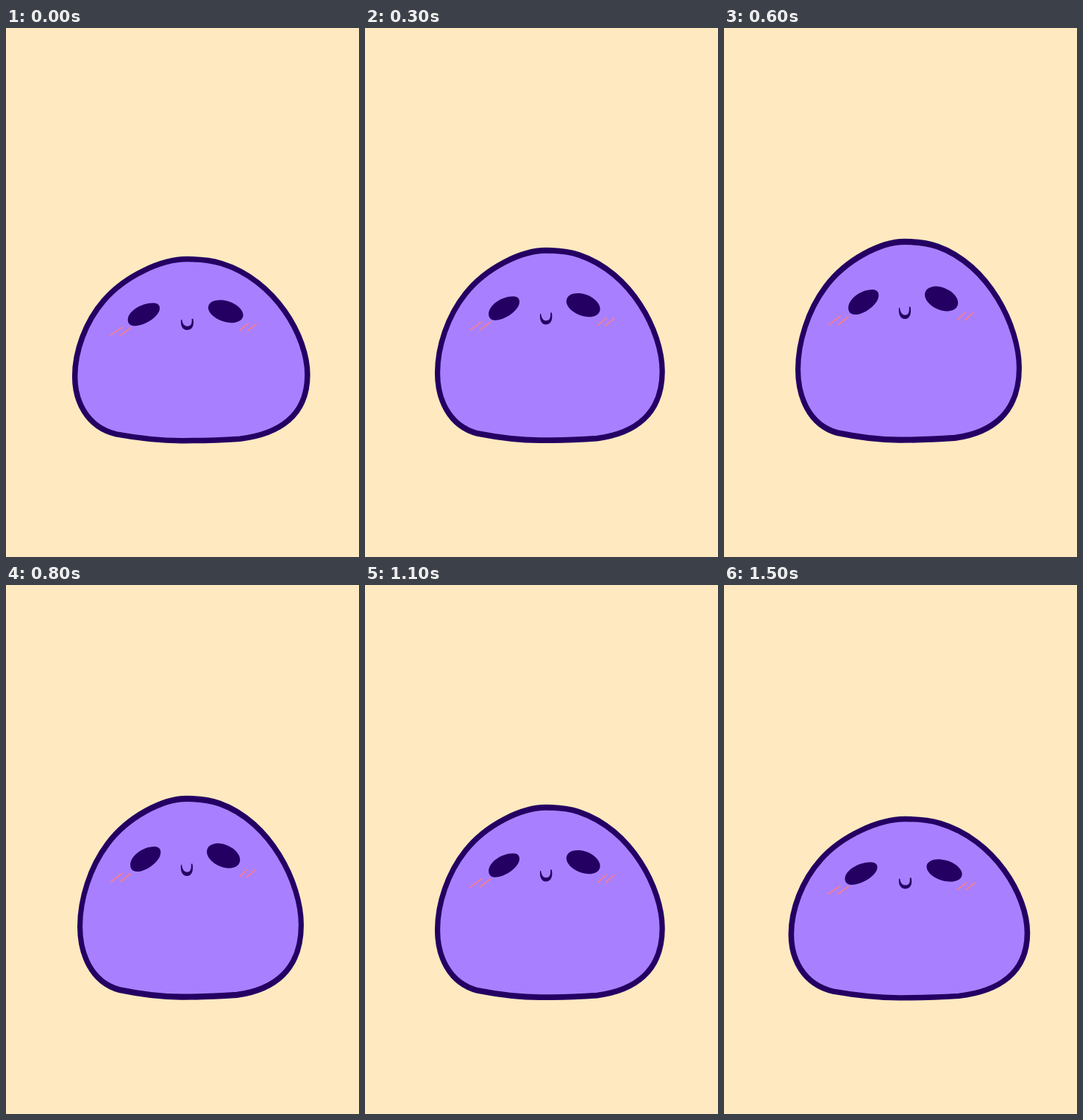
Write an HTML page that moves like this. It is 480 px wide and 720 px high and loops after 1600 ms.

```html
<!DOCTYPE html>
<html lang="en">
<head>
<meta charset="utf-8">
<title>Slime</title>
<style>
  html, body { margin: 0; width: 100%; height: 100%; overflow: hidden; background: #ffe9c0; }
  svg { display: block; width: 100%; height: 100%; }
</style>
</head>
<body>
<svg viewBox="0 0 480 720">
  <g id="slime" fill="#240063">
    <path fill="#a880ff" stroke="#240063" stroke-width="7.5" stroke-linejoin="round"
      d="M246 314.6C262 314.6 280 316.5 293 320.5C366 343 409.8 420 409.8 472C409.8 528 371 553 318 559.3C290 561 262 561.9 238 561.8C205 561.8 172 557 150 553C109 543 93.7 507 93.7 474C93.7 440 108 400 133 371C162 337 212 314.6 246 314.6Z"/>
    <path d="M165.7 397C166 386 183 374.5 200 374.3C208 374.3 210 379 208.7 384C206 394 188 405.5 175 405.5C169 405.5 165.5 402 165.7 397Z"/>
    <ellipse rx="24.6" ry="14.1" transform="translate(298.7 385.7) rotate(18.5)"/>
    <path d="M238 397C237 406 240.5 411 246.5 411C253 411 256.5 405 254.3 395.5L252.5 396C253.3 402 251.5 406 247 406C242 406 240 402.5 239.2 397Z"/>
    <g stroke="#ff7c85" stroke-linecap="round" stroke-width="1.6">
      <path id="blushL" d="M141 418L157 407.5M154.5 418L168.5 408"/>
      <path id="blushR" d="M319.5 411.5L330.5 402.5M329.5 412.5L341.5 403"/>
    </g>
  </g>
</svg>
<script>
const LOOP = 1600, STEP = 100, PEAK = 7;
const REST = { cx: 251.5, hw: 162, top: 311, bottom: 565 };
const $ = id => document.getElementById(id);
const setTransform = (id, value) => $(id).setAttribute('transform', value);

// squash: 0 = tallest, 8 = flattest
function draw(ms) {
  const squash = Math.abs(PEAK - Math.floor((ms % LOOP) / STEP));
  const cx = 250.6 + 0.13 * squash;
  const hw = 154 + 0.165 * squash ** 2;
  const top = 283 + 4 * squash;
  const bottom = 564 + squash / 8;
  const sx = hw / REST.hw;
  const sy = (bottom - top) / (REST.bottom - REST.top);
  setTransform('slime',
    `translate(${cx} ${bottom}) scale(${sx} ${sy}) translate(${-REST.cx} ${-REST.bottom})`);

  // The cheeks draw together as the body flattens
  const inward = 0.7 * (squash - 5);
  setTransform('blushL', `translate(${inward} 0)`);
  setTransform('blushR', `translate(${-inward} 0)`);
}

const start = performance.now();
function tick() {
  draw(performance.now() - start);
  requestAnimationFrame(tick);
}
tick();
</script>
</body>
</html>
```
